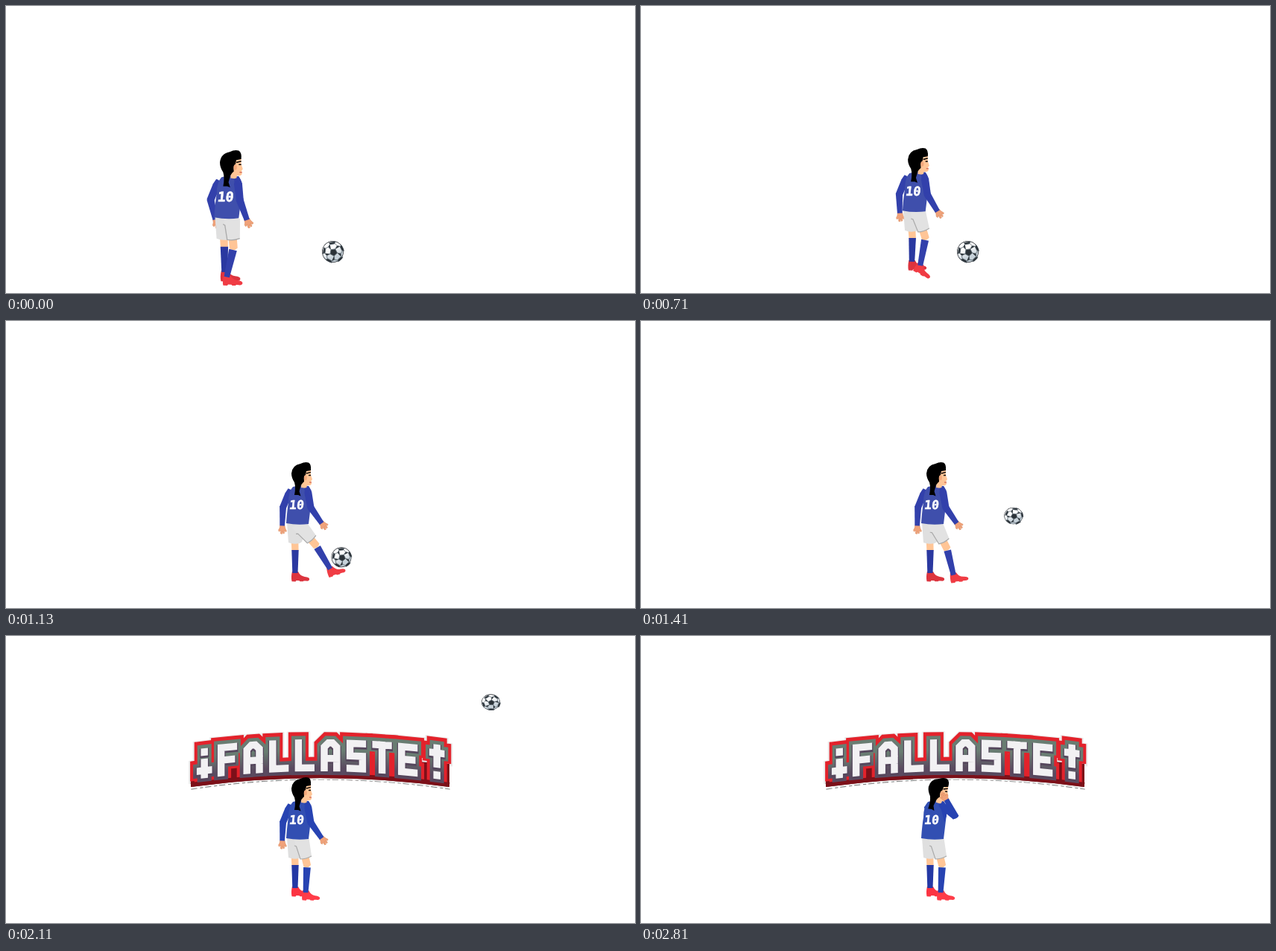
An HTML page that plays this animation: 844 by 386 pixels, repeating every 2.88 s.

```html
<!DOCTYPE html>
<html lang="es">
<head>
<meta charset="utf-8">
<title>Penalti fallado</title>
<style>
  html, body { margin: 0; width: 100%; height: 100%; overflow: hidden; background: #fff; }
  svg { display: block; width: 100vw; height: 100vh; --body: #3f4fac; --sleeve: #3240ab; --sock: #2a38a0; --shoe: #f03c44; --shoe2: #dc343e; }
  svg.vivid { --body: #324fb2; --sleeve: #2743b2; --sock: #2438a4; --shoe: #ff3c48; --shoe2: #fb3442; }
  .body { fill: var(--body); }
  .sleeve { fill: var(--sleeve); }
  .sock { fill: var(--sock); }
  .skin { fill: #ffc596; }
  .hand { fill: #f0a27a; stroke: #d98758; stroke-width: .5; }
  .num { font: bold 16.5px "DejaVu Sans Mono", "Liberation Mono", monospace; fill: #fff; stroke: #fff; stroke-width: .5; }
</style>
</head>
<body>
<svg id="stage" viewBox="0 0 844 386">
  <defs>
    <clipPath id="round"><circle r="14.3"/></clipPath>
    <linearGradient id="shine" x1=".25" y1="0" x2=".7" y2="1">
      <stop offset=".35" stop-color="#fff"/><stop offset=".75" stop-color="#c6d1d9"/>
    </linearGradient>
    <linearGradient id="edge" x2="0" y2="1">
      <stop offset=".3" stop-color="#697d72"/><stop offset="1" stop-color="#5a4a60"/>
    </linearGradient>
    <path id="hand" d="M-3-1H3L4 3 6 7 4.5 8 3 6 3 10 1.5 10.5 .5 7 0 11-2 10.5-2 6-4 8-5 6-3.5 3Z"/>
    <path id="shoe" d="M-4-2H4Q7 4 13 4.5 20 5 19.5 8 19 10.5 15 10H12L11 11H7L6 10H2L1 11.5H-4Q-5.5 6-4-2Z"/>
    <g id="word"></g>
  </defs>

  <g id="banner" fill="none" stroke-linecap="square">
    <path d="M249 206Q422 180 595 206" stroke="#888" stroke-width="1.2" stroke-dasharray="7 5 3 4"/>
    <use href="#word" stroke="#ebebeb" stroke-width="31"/>
    <path d="M248 172V203Q422 179 595 203V172Q422 158 248 172Z" fill="#7c1019"/>
    <use href="#word" y="-1" stroke="#e3222b" stroke-width="27"/>
    <path d="M248 200Q422 176 595 200" stroke="#7c1019" stroke-width="6" stroke-linecap="butt"/>
    <use href="#word" stroke="url(#edge)" stroke-width="19"/>
    <use href="#word" y="1.5" stroke="#55465c" stroke-width="12"/>
    <use href="#word" stroke="#f2f1f3" stroke-width="9.5"/>
  </g>

  <g id="ball">
    <circle r="14.5" fill="#20252b"/>
    <circle r="13.8" fill="url(#shine)"/>
    <g id="patches" clip-path="url(#round)" fill="#2b3238" stroke="#5b666f" stroke-width=".8"></g>
  </g>

  <g id="player">
    <g id="upL">
      <path class="sleeve" d="M-3-5Q4-6 5 2L4.5 22Q0 25-4.5 22L-4.5 2Z"/>
      <g id="foL">
        <use href="#hand" class="hand" y="25"/>
        <path class="sleeve" d="M-4.5-1Q0-4 4.5-1L3.2 25H-3.4Z"/>
      </g>
    </g>
    <g id="thL">
      <path class="skin" d="M-5 0H5L4.6 29H-4.6Z"/>
      <g id="shL">
        <use id="ftL" href="#shoe" fill="var(--shoe2)"/>
        <path class="sock" d="M-4.6 2H4.8L3.6 33H-3.6Z"/>
      </g>
    </g>
    <g id="thR">
      <path class="skin" d="M-5 0H5.4L5 30Q0 34-5 30Z"/>
      <g id="shR">
        <use id="ftR" href="#shoe" fill="var(--shoe)"/>
        <path class="sleeve" d="M-4.8 3H5L3.4 37H-3.4Z"/>
      </g>
    </g>
    <path d="M377 271H406L397 297 394 299Q386 301 379 298Z" fill="#dfdfdf"/>
    <g id="shorts">
      <path d="M386 272H406.5L410 296Q403 300 395 300L389 283Z" fill="#e2e2e2"/>
      <path d="M387 282L389.5 283 395 300Q403 300 410 296" fill="none" stroke="#aaa" stroke-width="1.2"/>
    </g>
    <path class="body" d="M385 223Q396 220 406 222 411 228 410 240L406 273Q391 275 376 272 377 256 379 244 379 229 385 223Z"/>
    <path class="sleeve" d="M399 222L406 222Q410 228 410 242L407 250 403 234Z"/>
    <text class="num" transform="translate(379.5 252.8) skewX(-6)">10</text>
    <g id="head">
      <path class="skin" d="M399 204L409 200 409 207 411 213 409.4 215 410 219Q409 222 404 221L403 225 396 224 397 211Z"/>
      <path d="M403 205L409 203.4M406 207.5H409" stroke="#000" stroke-width="1.5"/>
      <path d="M407 217H410" stroke="#c9524a"/>
      <path d="M383 205Q384 194 395 192 401 189 406 190.5 410 193 409 201L403 202 402 207Q399 208 400 216 396 219 395 224L393.5 229 395.5 235.5 392 234 387 234Q389 224 387 217 383 211 383 205Z"/>
      <ellipse cx="401.8" cy="211" rx="2" ry="3.2" fill="#f3a97c"/>
    </g>
    <g id="upR">
      <path class="sleeve" d="M-3-5Q4-6 5 2L4.6 22Q0 25-4.5 22L-5 2Z"/>
      <g id="foR">
        <use href="#hand" class="hand" y="25"/>
        <path class="sleeve" d="M-4.6-1Q0-4 4.6-1L3.2 26H-3.4Z"/>
      </g>
    </g>
  </g>
</svg>
<script>
const $ = id => document.getElementById(id);
const place = (id, value) => $(id).setAttribute("transform", value);
const mix = (a, b, f) => a + (b - a) * f;
const ramp = (k, from, to) => Math.min(1, Math.max(0, (k - from) / (to - from)));
const smooth = f => f * f * (3 - 2 * f);
const bump = (k, mid, reach) => Math.cos(Math.PI / 2 * Math.min(1, Math.abs(k - mid) / reach)) ** 2;

const LOOP = 2880, HOLD = 500, STEP = 70;
const KICK = 9, MISS = 24, END = 33;

// Each letter is a pen path on a grid, placed along a shallow arc.
const PEN = {
  "¡": "M2 1.5V1.6M2 4V7M1 6H3",
  F: "M1 7V1H4M1 4H3.5",
  A: "M1 7V2L2 1H3L4 2V7M1 4.7H4",
  L: "M1 1V7H4",
  S: "M4 1H1V4H4V7H1",
  T: "M1 1H4M2.5 1V7",
  E: "M4 1H1V7H4M1 4H3.5",
  "!": "M2 .4V4.3M1 1.6H3M2 6.9V7"
};
const CELL = 5.6, BEND = 0.0004;

function letter(ch, x) {
  const from = x + 14 - 418;
  const tilt = Math.atan(2 * BEND * from) * 180 / Math.PI;
  const y = 138 + BEND * (x - 418) ** 2;
  const d = PEN[ch].replace(/[\d.]+/g, n => (n * CELL).toFixed(1));
  return `<path d="${d}" transform="translate(${x} ${y}) skewY(${tilt})"/>`;
}
$("word").innerHTML = letter("¡", 255) + letter("!", 567) +
  [..."FALLASTE"].map((ch, i) => letter(ch, 283 + 34.6 * i)).join("");

// Ball: a middle pentagon, seams and five patches on the rim.
const polar = (r, deg) => {
  const a = deg * Math.PI / 180;
  return `${(r * Math.cos(a)).toFixed(2)} ${(r * Math.sin(a)).toFixed(2)}`;
};
let seams = "M" + [0, 1, 2, 3, 4].map(i => polar(5, i * 72)).join("L") + "Z";
for (let a = 0; a < 360; a += 72) {
  seams += `M${polar(5, a)}L${polar(10, a)}L${polar(12, a + 20)}M${polar(10, a)}L${polar(12, a - 20)}`;
  seams += `M${polar(11.5, a + 22)}L${polar(11.5, a + 50)}L${polar(15, a + 55)}L${polar(15, a + 17)}Z`;
}
$("patches").innerHTML = `<path d="${seams}"/>`;

// Angles are measured from straight down, positive to the right.
function limb(upper, lower, x, y, length, a, b) {
  place(upper, `translate(${x} ${y}) rotate(${-a})`);
  place(lower, `translate(0 ${length}) rotate(${a - b})`);
}

function drawLegs(k, walk) {
  const push = bump(k, 1, 1.5), lift = bump(k, 4, 2.5);
  const kick = ramp(k, KICK - 1, KICK + 1) * (1 - ramp(k, 12, 16));
  const thigh = mix(5, 14, walk) + 6 * lift + 27 * kick;
  const shin = mix(-16, -3, walk) + 13 * push - 4 * lift + 34 * kick;
  limb("thR", "shR", 397, 280, 29, thigh, shin);
  place("ftR", `translate(0 36) rotate(${shin + 3 + 29 * lift - 18 * kick})`);
  place("shorts", `rotate(${14 - thigh} 397 280)`);

  const shinL = 3 * push - lift;
  limb("thL", "shL", 387, 280, 26, 2 + 3 * push + 2 * lift, shinL);
  place("ftL", `translate(0 33) rotate(${shinL + 2})`);
}

function drawArms(k, walk) {
  const grief = smooth(ramp(k, MISS, END));
  limb("upL", "foL", 379.5 + 6 * grief, 231, 21, mix(-22, 60, grief), mix(mix(14, -2, walk), 185, grief));
  limb("upR", "foR", 405, 229, 22, mix(mix(6, 10, walk), 50, grief), mix(mix(20, 35, walk), 208, grief));
  place("head", `rotate(${9 * grief} 398 222)`);
}

function drawBall(k) {
  const d = ramp(k, KICK, MISS) * (MISS - KICK), out = Math.max(0, k - MISS);
  const x = 438.5 + 11.34 * d + 0.186 * d * d + 25.4 * out;
  const y = 330.5 - 12.5 * d - 0.24 * d * d + 1.05 * out * out;
  const rx = 12.5 + 2 * Math.exp(-d / 1.4), ry = 10.6 + 3.9 * Math.exp(-d / 3);
  place("ball", `translate(${x} ${y}) scale(${rx / 14.5} ${ry / 14.5})`);
  place("patches", `translate(1 .8) rotate(${10 + 3 * d})`);
  $("ball").style.display = out > 7 ? "none" : "";
}

function draw(k) {
  const walk = ramp(k, 0, 5.4);
  place("player", `translate(${287 + 96 * walk} ${194 - 4 * walk}) scale(${1.1 - 0.1 * walk}) translate(-383 -190)`);
  drawLegs(k, walk);
  drawArms(k, walk);
  drawBall(k);
  $("banner").style.display = k < MISS ? "none" : "";
  $("stage").classList.toggle("vivid", k >= MISS);
}

const start = performance.now();
function tick() {
  const t = (performance.now() - start) % LOOP;
  draw(t < HOLD ? 0 : 1 + Math.floor((t - HOLD) / STEP));
  requestAnimationFrame(tick);
}
tick();
</script>
</body>
</html>
```
